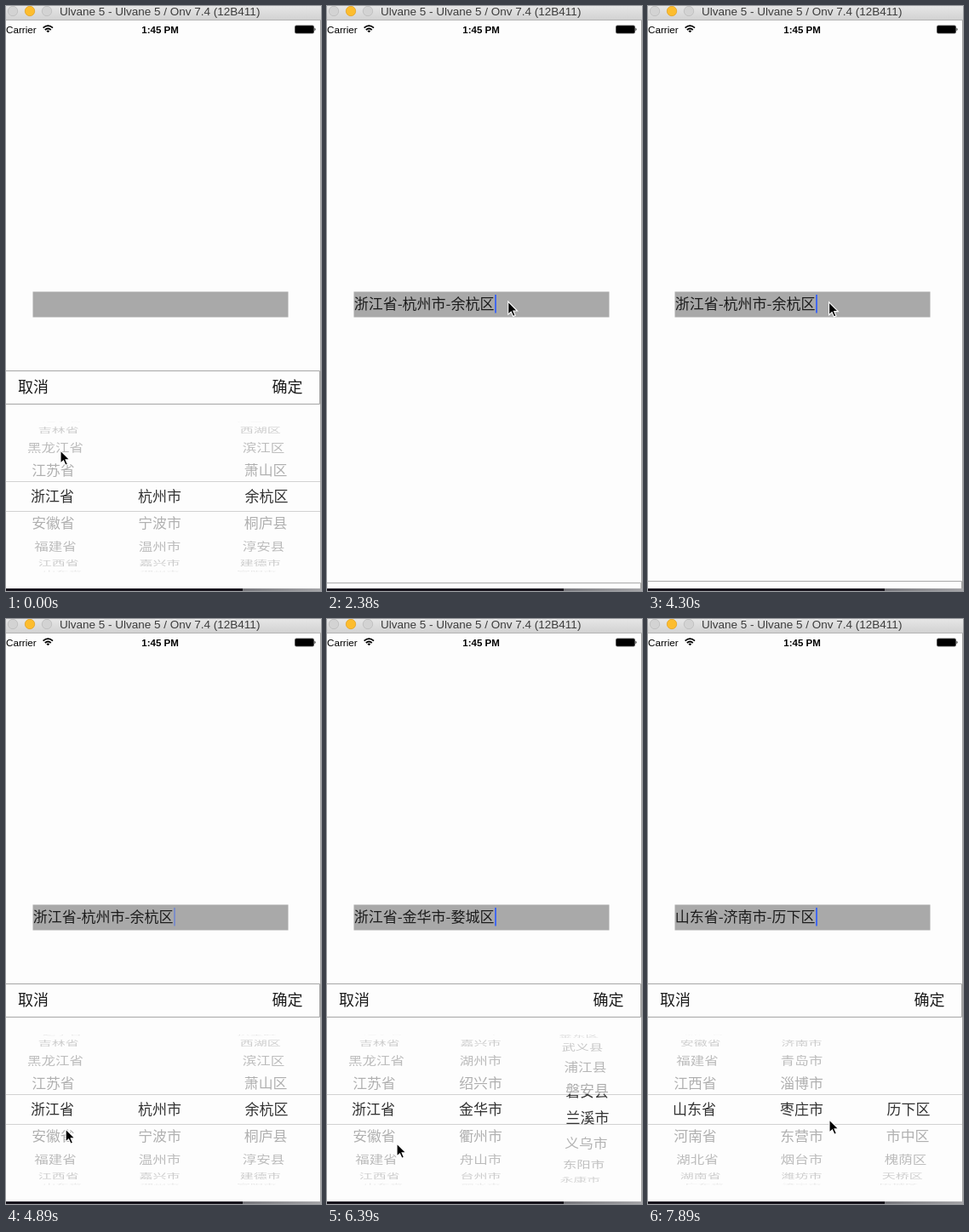
Animation, 370 px wide and 687 px high, one loop 8 s. Source, as an HTML page:

```html
<!DOCTYPE html>
<html lang="zh">
<head>
<meta charset="utf-8">
<style>
html, body { margin: 0; width: 100%; height: 100%; overflow: hidden; background: #fdfdfd; }
svg { display: block; width: 370px; height: 687px; }
.latin { font-family: "Liberation Sans", Arial, sans-serif; }
.cjk { font-family: "Noto Sans CJK SC", "Noto Sans CJK", "Noto Sans CJK JP", sans-serif; font-weight: 300; font-size: 17px; fill: #1c1c1c; }
</style>
</head>
<body>
<svg viewBox="0 0 370 687">
  <defs>
    <linearGradient id="bar" x2="0" y2="1">
      <stop stop-color="#e6e6e6"/><stop offset="1" stop-color="#d2d2d2"/>
    </linearGradient>
    <linearGradient id="desk">
      <stop stop-color="#77777c"/><stop offset="1" stop-color="#a5a5a8"/>
    </linearGradient>
    <clipPath id="screen"><rect width="370" height="684"/></clipPath>
    <clipPath id="wheel"><path d="M0 488H370V558H0zM0 593.5H370V664.5H0z"/></clipPath>
    <clipPath id="band"><rect y="558" width="370" height="35.5"/></clipPath>
  </defs>
  <rect width="370" height="687" fill="#fdfdfd"/>
  <rect width="370" height="16" fill="url(#bar)"/>
  <path d="M0 16.5H370" stroke="#b4b4b4"/>
  <g stroke-width=".8">
    <circle cx="8" cy="6" r="5.7" fill="#d3d3d3" stroke="#bcbcbc"/>
    <circle cx="28" cy="6" r="5.7" fill="#fdbd2e" stroke="#e2a325"/>
    <circle cx="48" cy="6" r="5.7" fill="#d3d3d3" stroke="#bcbcbc"/>
  </g>
  <g class="latin">
    <text x="63" y="11" font-size="13.5" fill="#3c3c3c">Ulvane 5 - Ulvane 5 / Onv 7.4 (12B411)</text>
    <text x="0" y="31.5" font-size="11.7">Carrier</text>
    <text x="181" y="31.5" font-size="11.5" font-weight="bold" text-anchor="middle">1:45 PM</text>
  </g>
  <g fill="none" stroke="#000" stroke-width="1.7">
    <path d="M43.6 25.6Q49.3 20.6 55 25.6M45.8 28Q49.3 25 52.8 28"/>
    <path d="M47.4 29.2Q49.3 27.8 51.2 29.2L49.3 31.2z" fill="#000" stroke="none"/>
  </g>
  <rect x="339.5" y="23" width="22" height="9" rx="1.5" stroke="#444" stroke-width=".8"/>
  <path d="M362.5 25.6Q364.6 27.5 362.5 29.4z"/>

  <rect x="31.5" y="335.5" width="300" height="30" fill="#a9a9a9"/>
  <text id="value" class="cjk" x="31.7" y="355.8"></text>
  <rect id="caret" y="339" width="2" height="21.5" fill="#4168f0"/>

  <g clip-path="url(#screen)">
    <g id="panel">
      <rect y="428" width="369" height="260" fill="#fdfdfd"/>
      <path d="M0 428.5H368.5V467.5H0" fill="none" stroke="#a6a6a6"/>
      <g class="cjk" style="font-size:18px">
        <text x="14" y="454.3">取消</text>
        <text x="312.5" y="454.3">确定</text>
      </g>
      <path d="M0 558.5H369M0 593.5H369" stroke="#d2d2d2"/>
      <g id="dim" class="cjk" clip-path="url(#wheel)" text-anchor="middle"></g>
      <g id="lit" class="cjk" clip-path="url(#band)" text-anchor="middle"></g>
    </g>
  </g>
  <path d="M369.5 17V684" stroke="#a0a0a0"/>
  <rect y="684" width="278" height="3" fill="#17131c"/>
  <rect x="278" y="684" width="92" height="3" fill="url(#desk)"/>
  <path id="mouse" d="M0 0V15L3.5 11.9L5.9 17.3L8.4 16.2L6.1 10.9H10.8Z" stroke="#fff" stroke-width="1.1"/>
</svg>
<script>
const LOOP = 8000, TICK = 148.15, STEP = 148.6, RELOAD = 7870;
const el = id => document.getElementById(id);
const clamp = v => Math.min(1, Math.max(0, v));
const smooth = u => u * u * (3 - 2 * u);
const names = (list, suffix) => list.split(' ').map(n => n.length > 2 ? n : n + suffix);

const provinces = names('山西 内蒙古 辽宁 吉林 黑龙江省 江苏 浙江 安徽 福建 江西 山东 河南 湖北 湖南 广东 海南', '省');
const zhejiang = names('杭州 宁波 温州 嘉兴 湖州 绍兴 金华 衢州 舟山 台州 丽水', '市');
const shandong = names('济南 青岛 淄博 枣庄 东营 烟台 潍坊 济宁 泰安', '市');
const hangzhou = names('上城 下城 江干 拱墅 西湖 滨江 萧山 余杭 桐庐县 淳安县 建德市 富阳市 临安市', '区');
const jinhua = names('婺城 金东 武义县 浦江县 磐安县 兰溪市 义乌市 东阳市 永康市', '区');
const jinan = names('历下 市中 槐荫 天桥 历城 长清', '区');

// The panel opens and closes on alternate taps.
const taps = [-850, 1280, 2360, 3357, 4290];

// Each spin is driven by a number of upward flicks of the mouse.
const citySpin = { start: 4990, end: 5720, from: 0, to: 6, flicks: 2 };
const districtSpin = { start: 5880, end: 6720, from: 0, to: 5, flicks: 1 };
const provinceSpin = { start: 6720, end: 7580, from: 6, to: 10, flicks: 2 };
const spins = [citySpin, districtSpin, provinceSpin];
const progress = (spin, t) => clamp((t - spin.start) / (spin.end - spin.start));
const spinRow = (spin, t) => spin.from + (spin.to - spin.from) * (1 - (1 - progress(spin, t)) ** 3);

const confirm = [329, 446], cancel = [52, 440], field = [213, 347];
const leftWheel = [70, 616], midWheel = [177, 616], rightWheel = [304, 616];
const stops = [
  [0, [64, 522]], [1150, confirm], [1280, confirm], [1930, field], [2360, field], [3120, cancel], [3357, cancel],
  [4000, field], [4290, field], [4900, [70, 599]], [5100, midWheel], [5640, midWheel], [5880, rightWheel],
  [6200, rightWheel], [6420, leftWheel], [7580, leftWheel], [RELOAD, [213, 588]]
];

function mousePoint(t) {
  const next = stops.findIndex(stop => stop[0] > t);
  if (next < 0) return stops[stops.length - 1][1];
  const [t0, a] = stops[next - 1], [t1, b] = stops[next];
  const u = smooth((t - t0) / (t1 - t0));
  const lift = spins.reduce((sum, s) => sum + 60 * Math.sin(Math.PI * s.flicks * Math.min(1, 2 * progress(s, t))) ** 2, 0);
  return [a[0] + (b[0] - a[0]) * u, a[1] + (b[1] - a[1]) * u - lift];
}

// Critically damped spring.
function settle(ms) {
  const x = Math.max(0, ms) * .01826;
  return 1 - (1 + x) * Math.exp(-x);
}

const panelOffset = t => 260 * (1 - taps.reduce((sum, tap, i) => sum + (i % 2 ? -1 : 1) * settle(t - tap), 0));

function caretAlpha(t) {
  const past = taps.filter(tap => tap <= t);
  if (past.length % 2 === 0) return 0;
  if (t > citySpin.start && t < districtSpin.end || t >= RELOAD) return 1;
  const p = (t - past[past.length - 1]) % 1000;
  return Math.max(clamp((700 - p) / 200), clamp((p - 900) / 100));
}

function valueText(t) {
  if (t < taps[1]) return '';
  if (t < citySpin.end) return '浙江省-杭州市-余杭区';
  if (t < districtSpin.end) return '浙江省-金华市-婺城区';
  return t < RELOAD ? '浙江省-金华市-兰溪市' : '山东省-济南市-历下区';
}

// Rows sit on a cylinder of radius 90, twenty degrees apart.
function wheel(items, row, x) {
  let dim = '', lit = '';
  items.forEach((name, i) => {
    const angle = (i - row) * Math.PI / 9;
    if (Math.abs(angle) > 1.5) return;
    const c = Math.cos(angle), near = 730 / (730 + 90 * (1 - c));
    const cx = 180.5 + (x - 180.5) * near, cy = 576 + 90 * Math.sin(angle);
    const text = (sy, alpha) => `<text y="6.3" opacity="${alpha}" transform="matrix(${near} 0 0 ${sy} ${cx} ${cy})">${name}</text>`;
    dim += text(c, .06 + .3 * c);
    if (Math.abs(i - row) < 1.2) lit += text(1, .9);
  });
  return [dim, lit];
}

function draw(t) {
  el('mouse').setAttribute('transform', `translate(${mousePoint(t)})`);
  el('panel').setAttribute('transform', `translate(0 ${panelOffset(t)})`);
  const value = valueText(t);
  el('value').textContent = value;
  el('caret').setAttribute('x', value ? 197 : 31.5);
  el('caret').setAttribute('opacity', caretAlpha(t));

  const reloaded = t >= RELOAD;
  const cities = reloaded ? [shandong, 3] : [zhejiang, spinRow(citySpin, t)];
  const districts = reloaded ? [jinan, 0]
    : t < citySpin.end ? [hangzhou, 7] : [jinhua, spinRow(districtSpin, t)];
  const columns = [
    wheel(provinces, spinRow(provinceSpin, t), 54.5),
    wheel(...cities, 180.5),
    wheel(...districts, 306)
  ];
  ['dim', 'lit'].forEach((id, i) => el(id).innerHTML = columns.map(c => c[i]).join(''));
}

// The picture advances in even steps, as a screen recording does.
let shown = -1;
function loop() {
  const step = Math.min(53, Math.floor(performance.now() % LOOP / TICK));
  if (step !== shown) draw((shown = step) * STEP);
  requestAnimationFrame(loop);
}
loop();
</script>
</body>
</html>
```
